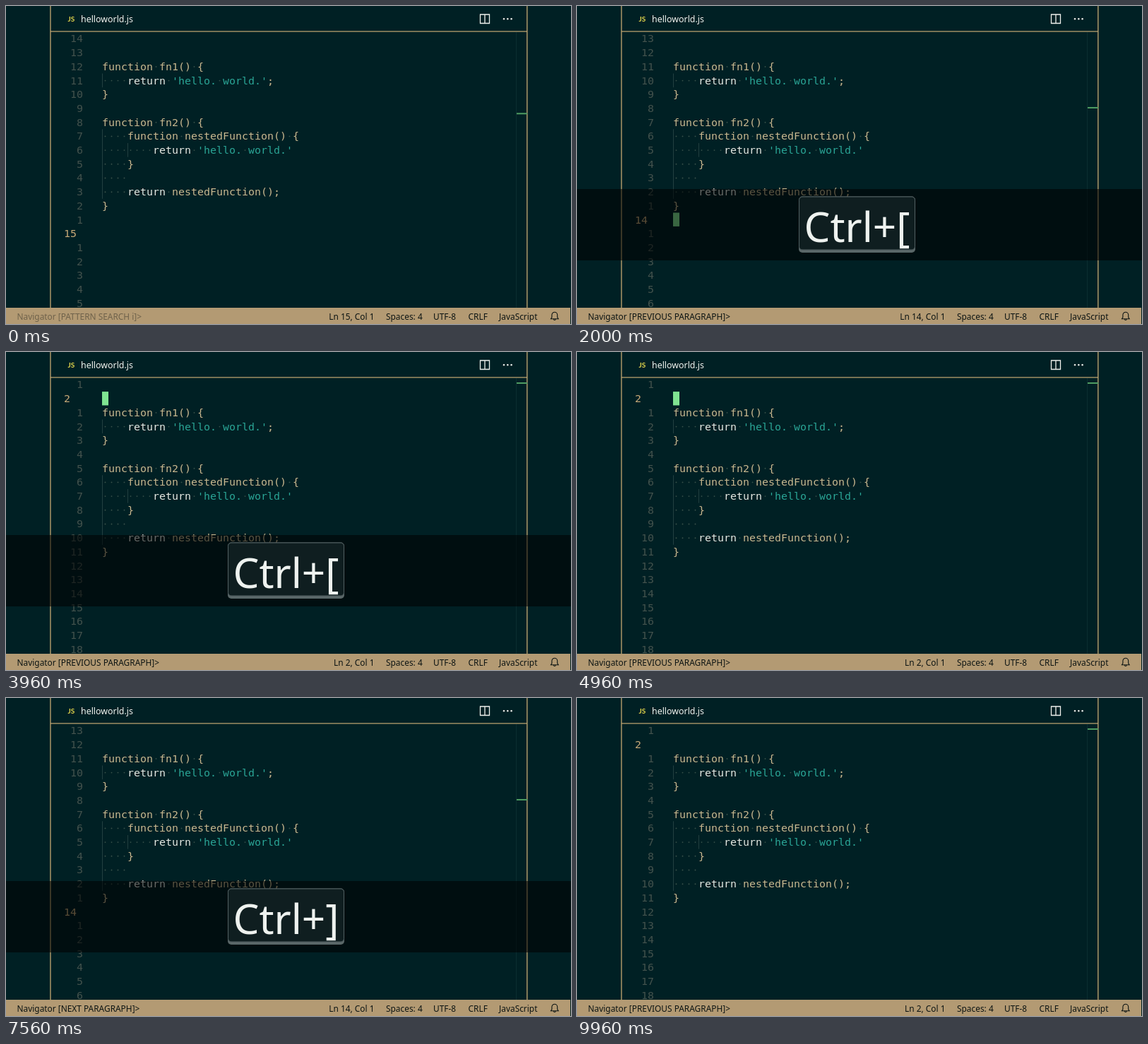
An HTML page for the animation above (10000 ms loop, 800 by 450 pixels).

```html
<!DOCTYPE html>
<html lang="en">
<head>
<meta charset="utf-8">
<title>Paragraph navigation</title>
<style>
  html, body { margin: 0; width: 100%; height: 100%; overflow: hidden; background: #002024; }
  svg { display: block; width: 800px; height: 450px; }
  text { white-space: pre; }
  .mono { font: 14.95px "DejaVu Sans Mono", monospace; }
  .ui { font: 11.9px "Noto Sans", "Open Sans", sans-serif; }
  .title { font-size: 12.4px; }
  .js { font: bold 10px "Lato", sans-serif; }
  .key { font: 58.5px "Noto Sans", "Open Sans", sans-serif; }
</style>
</head>
<body>
<svg id="stage" viewBox="0 0 800 450" xmlns="http://www.w3.org/2000/svg"></svg>
<script>
const LOOP = 10000, ROWS = 20, ROW_H = 19.7, CHAR_W = 9, CODE_X = 136;
const TAN = '#c9b78f', DARK = '#0c1413', GOLD = '#c5a873';

const CODE = {
  3: 'function fn1() {',
  4: "    return 'hello. world.';",
  5: '}',
  7: 'function fn2() {',
  8: '    function nestedFunction() {',
  9: "        return 'hello. world.'",
  10: '    }',
  11: '    ',
  12: '    return nestedFunction();',
  13: '}'
};

// Key presses: time, line reached, direction
const PRESSES = [
  [1920, 14, '['], [2560, 11, '['], [3200, 6, '['], [3920, 2, '['],
  [5720, 6, ']'], [6350, 11, ']'], [7000, 14, ']'],
  [8085, 11, '['], [8660, 6, '['], [9260, 2, '[']
];
const START = [-660, 15, ''];
const WAKE = 880, HOLD = 650, FADE = 40;

const stage = document.getElementById('stage');
const rowTop = line => 36.4 + ROW_H * (line - 1);
const baseline = line => 51.4 + ROW_H * (line - 1);

function add(tag, attrs, parent = stage) {
  const node = document.createElementNS('http://www.w3.org/2000/svg', tag);
  for (const name in attrs) node.setAttribute(name, attrs[name]);
  parent.append(node);
  return node;
}
function rect(x, y, width, height, fill, parent) {
  return add('rect', { x, y, width, height, fill }, parent);
}
function label(x, y, str, cls, fill, anchor = 'start', parent) {
  const node = add('text', { x, y, class: cls, fill, 'text-anchor': anchor }, parent);
  node.textContent = str;
  return node;
}
function path(d, stroke, width = 1, parent) {
  return add('path', { d, stroke, 'stroke-width': width, fill: 'none' }, parent);
}

// Frame and header
rect(0, 0, 800, 450, '#002024');
rect(722, 37, 1, 390, '#0b2e31');
rect(62.3, 0, 1.3, 427, GOLD);
rect(737.2, 0, 1.3, 427, GOLD);
rect(63, 35.4, 675, 1.2, GOLD);
label(87.5, 21.6, 'JS', 'js', '#e3d64c');
label(106, 22.8, 'helloworld.js', 'ui title', '#f4f4f0');
path('M671.5 12h13v12.5h-13zM678 12v12.5', '#f0f0ec', 1.3);
for (const cx of [705, 710.3, 715.6]) add('circle', { cx, cy: 18.3, r: 1.2, fill: '#f0f0ec' });

// Gutter
const numbers = [];
for (let line = 1; line <= ROWS; line++) numbers.push(label(109, baseline(line), '', 'mono', ''));

// Indent guides
const guide = (col, from, to) =>
  rect(CODE_X + col * CHAR_W, rowTop(from), 1, ROW_H * (to - from + 1), '#223f40');
guide(0, 4, 4);
guide(0, 8, 12);
guide(4, 9, 9);

// Code
function drawLine(line, str) {
  const y = baseline(line);
  const colour = part => part[0] === "'" ? '#2aa596' : part === 'return' ? '#e6e8e2' : TAN;
  for (const m of str.matchAll(/'[^']*'|return|[^\s']+/g))
    label(CODE_X + m.index * CHAR_W, y, m[0], 'mono', colour(m[0]));
  for (const m of str.matchAll(/ /g))
    add('circle', { cx: CODE_X + (m.index + .5) * CHAR_W, cy: y - 4.9, r: .95, fill: '#38514a' });
}
for (const line in CODE) drawLine(+line, CODE[line]);

// Bracket pair around the current block
const scope = add('g', {});
path(`M271 ${rowTop(8) - .2}H136.5V${rowTop(13)}`, '#7b8074', 1, scope);
for (const [x, line] of [[271, 7], [136, 13]])
  path(`M${x + .5} ${rowTop(line) + .4}h8.4v${ROW_H - 1}h-8.4z`, '#8c846c', 1, scope);

const cursor = rect(CODE_X, 0, CHAR_W, ROW_H - .3, '#7fe391');
const mark = rect(723, 0, 15, 2, '#4f9c62');

// Status bar
rect(0, 427, 799, 23, '#b39a73');
const mode = label(15.5, 443.6, '', 'ui', DARK);
const place = label(521.5, 443.6, '', 'ui', DARK, 'end');
[[538, 'Spaces: 4'], [605, 'UTF-8'], [654.5, 'CRLF'], [698, 'JavaScript']]
  .forEach(([x, str]) => label(x, 443.6, str, 'ui', DARK));
path('M771.5 442.8h10.6l-1.4-2.2v-3.4a3.9 3.9 0 0 0-7.8 0v3.4zM775.2 443.4a1.7 1.7 0 0 0 3.2 0', DARK, 1.1);

// Pressed key banner
const banner = add('g', {});
rect(0, 259, 800, 101, 'rgba(0,0,0,.55)', banner);
add('rect', { x: 314, y: 269.5, width: 165, height: 79.5, rx: 5, fill: '#5a6768' }, banner);
add('rect', { x: 314.5, y: 270, width: 164, height: 75, rx: 4.5, fill: '#0f1e20', stroke: '#536062' }, banner);
const keyText = label(396.5, 334, '', 'key', '#eef2ef', 'middle', banner);

function blink(age) {
  const p = age % 1000;
  const x = Math.min(1, Math.max(0, ((p > 500 ? 1000 - p : p) - 100) / 200));
  return 1 - x * x * (3 - 2 * x);
}

function bannerAlpha(age) {
  if (age < HOLD) return Math.min(1, .6 + .4 * age / FADE);
  return Math.max(0, 1 - (age - HOLD) / FADE);
}

function showLine(line) {
  numbers.forEach((node, i) => {
    const away = Math.abs(i + 1 - line);
    node.textContent = away || line;
    node.setAttribute('x', away ? 109 : 82);
    node.setAttribute('text-anchor', away ? 'end' : 'start');
    node.setAttribute('fill', away ? '#43524d' : '#c8a978');
  });
  cursor.setAttribute('y', rowTop(line));
  mark.setAttribute('y', 43 + (line - 2) * 8.33);
  scope.setAttribute('visibility', line === 11 ? 'visible' : 'hidden');
  place.textContent = `Ln ${line}, Col 1`;
}

let shown = null;
function render(t) {
  const press = PRESSES.findLast(p => p[0] <= t) || START;
  const [time, line, key] = press;
  if (press !== shown) {
    shown = press;
    showLine(line);
    const name = { '[': 'PREVIOUS PARAGRAPH', ']': 'NEXT PARAGRAPH' }[key] || 'PATTERN SEARCH i';
    mode.textContent = `Navigator [${name}]>`;
    keyText.textContent = 'Ctrl+' + key;
  }
  mode.setAttribute('fill', t < WAKE ? '#6f624b' : DARK);
  cursor.setAttribute('opacity', blink(t - time));
  banner.setAttribute('opacity', key ? bannerAlpha(t - time) : 0);
}

const begin = performance.now();
function tick() {
  render((performance.now() - begin) % LOOP);
  requestAnimationFrame(tick);
}
tick();
</script>
</body>
</html>
```
